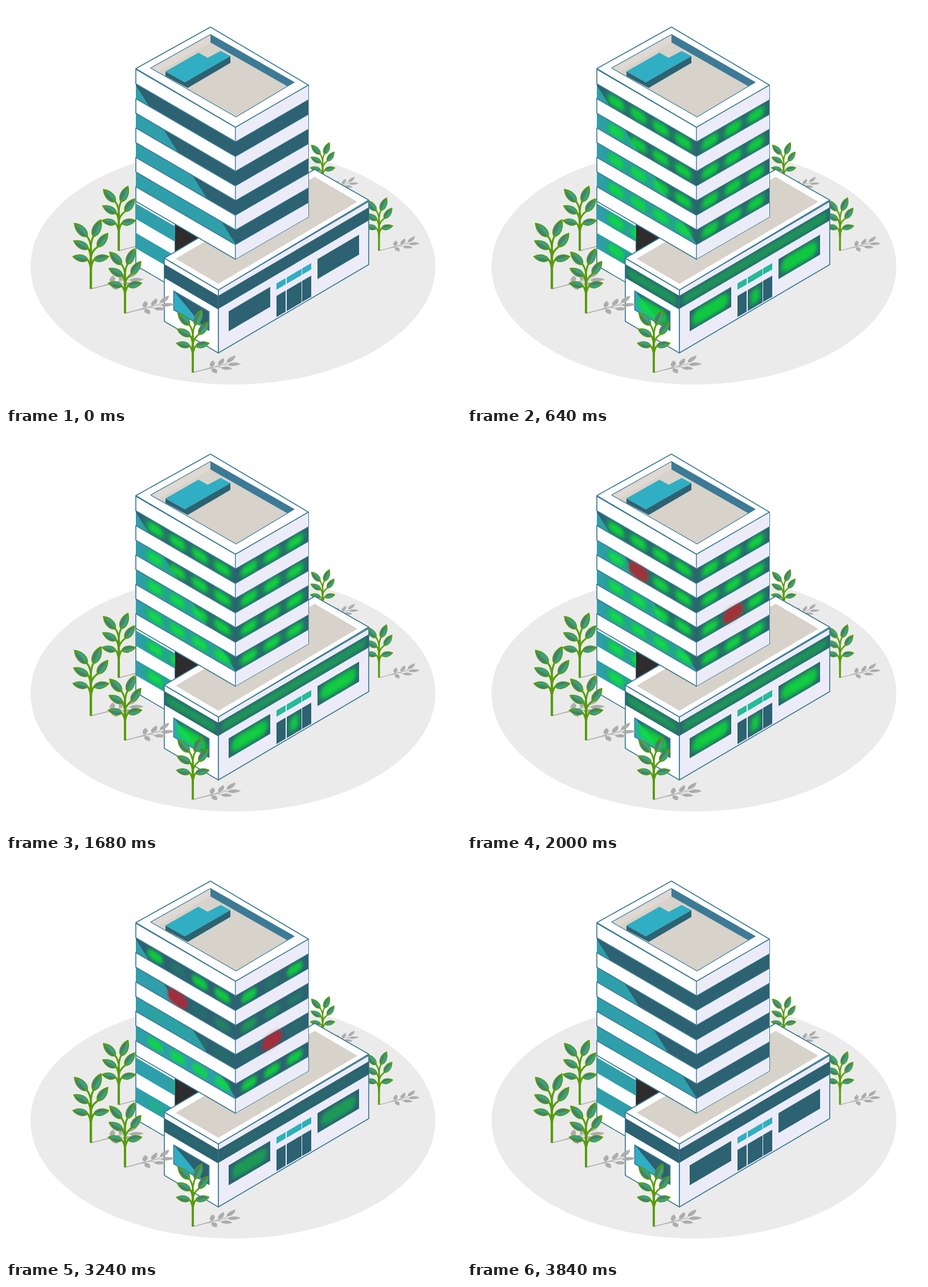
An HTML page for the animation above (4 s loop, 799 by 701 pixels).

```html
<!DOCTYPE html>
<html lang="en">
<head>
<meta charset="utf-8">
<title>Building lights</title>
<style>
html, body { margin: 0; width: 100%; height: 100%; overflow: hidden; background: #fff; }
#stage { display: block; width: 100vw; height: 100vh; }
rect, polygon { vector-effect: non-scaling-stroke; stroke-linejoin: round; }
.light, .red { opacity: 0; }
</style>
</head>
<body>
<svg id="stage" viewBox="0 0 799 701"></svg>
<script>
const LINE = '#3d7a96', DARK = '#2c6272', AQUA = '#30aec4', TEAL = '#2e9fab', PALE = '#ebecf8', BEIGE = '#d7d2ca';
const PITCH = 51.6, BAND = 25.6;

const repeat = (n, make) => Array.from({ length: n }, (_, i) => make(i)).join('');
const poly = (points, fill, stroke = 'none', width = 1.7) =>
  `<polygon points="${points}" fill="${fill}" stroke="${stroke}" stroke-width="${width}"/>`;
const box = (x, y, w, h, fill, stroke = 'none', width = 1.7) =>
  `<rect x="${x}" y="${y}" width="${w}" height="${h}" fill="${fill}" stroke="${stroke}" stroke-width="${width}"/>`;
// A wall in isometric view: its content is laid out flat and skewed.
const wall = (x, y, slope, content) => `<g transform="matrix(1 ${slope} 0 1 ${x} ${y})">${content}</g>`;
// A glass area that clips its content.
const pane = (x, y, w, h, fill, content) =>
  box(x, y, w, h, fill) + `<svg x="${x}" y="${y}" width="${w}" height="${h}">${content}</svg>`;

const glow = (cls, x, y, w, h, blur, fill, opacity = 1) =>
  `<rect class="${cls}" x="${x - w / 2}" y="${y - h / 2}" width="${w}" height="${h}" rx="${Math.min(w, h) * .45}"
    fill="${fill}" opacity="${opacity}" filter="url(#blur${blur})"/>`;

// `level` is the brightness left at 3240 ms; it sets when the light goes out.
const light = (x, y, level, w = 27, h = 17, power = .82) =>
  `<g class="light" data-level="${level}" data-power="${power}">
    ${glow('halo', x, y, w + 11, h + 8, 3, '#10b050', 0)}${glow('core', x, y, w, h, 2, '#0ade36')}
    ${glow('spark', x, y, w * .6, h * .42, 1, '#14e83c', 0)}</g>`;

const red = (x, y) =>
  `<g class="red">${glow('', x, y, 38, 28, 2, '#a82c3a', .3)}${glow('', x, y, 33, 23, 1, '#a82c3a', .93)}</g>`;

// Leaves: [base x, base y, angle from upright]
const leaves = [[4, -86, 24], [11, -69, 37], [-6, -86, -44], [-4, -66, -62], [-5, -48, -78], [5, -48, 78]];

function plant(stem, left, right) {
  return `<g stroke="${stem}" fill="none" stroke-linejoin="round"><path d="M-2 0V-66H2V0Z" fill="${stem}" stroke="none"/>` +
    leaves.map(([x, y, angle]) => `<path d="M0 ${y + 20}Q0 ${y + 8} ${x} ${y}" stroke-width="3"/>
      <g transform="translate(${x} ${y}) rotate(${angle}) scale(${.62 - y / 230})" stroke-width="2">
        <path d="M0 0C-9 -6 -8 -20 0 -30Z" fill="${left}"/><path d="M0 0C9 -6 8 -20 0 -30Z" fill="${right}"/></g>`).join('') + '</g>';
}
const tree = (x, y, size) => `<g transform="translate(${x} ${y}) scale(${size})">
  <g transform="matrix(.12 .38 -.74 .19 0 0)">${plant('url(#shade)', 'url(#shade)', 'url(#shade)')}</g>
  ${plant('#579b08', LINE, '#2fa0b0')}</g>`;

const whiteBands = (w, fill, width) => repeat(5, i => box(0, i * PITCH, w, BAND, fill, LINE, width));
const level = (row, i, from, step) => [i === 1 ? .15 : 1, from + step * i, .1, 1.2][row];
const litRows = (count, w, x, step, from, change) => repeat(4, row =>
  pane(0, BAND + row * PITCH, w, PITCH - BAND, 'none',
    repeat(count, i => light(x + step * i, 13, level(row, i, from, change)))));

function lowerFloors() {
  const floor = i => pane(0, 4 + BAND + (4 + i) * PITCH, 69, 27, TEAL, light(34, 13, i * .3) + light(73, 13, .25));
  return wall(228, 111, .582, box(0, 230, 69, 115, '#fff', LINE) + repeat(2, floor)) +
    poly('297,380 340,406 297,432', '#2e2c2d');
}

function annex() {
  const roof = poly('278,443 542,287 637,341 373,499', '#fff', LINE) +
    poly('298,444 542,300 617,344 373,488', BEIGE);
  const left = box(0, 0, 95, 111, '#fff', LINE) +
    pane(0, 10.5, 95, 24, DARK, light(47, 12, .1, 86, 15, .4)) +
    pane(16, 47.5, 63, 34, DARK, poly('0,0 54,34 0,34', AQUA) + light(32, 17, -.25, 50, 23)) +
    box(16.5, 48, 62, 33, 'none', LINE);
  const windows = [18, 174].map(x => pane(x, 48.5, 73, 35, DARK, light(36.5, 17.5, .55, 61, 24))).join('');
  const entry = [[102, 16], [120, 26], [147, 16]].map(([x, w], i) =>
    pane(x, 49, w, 11, AQUA, light(w / 2, 5, .25, w, 9, .4)) +
    pane(x, 71, w, 37, DARK, i === 1 ? light(w / 2, 18, -.5, 14, 24, .75) : '')).join('');
  const right = box(0, 0, 264, 111, PALE, LINE) +
    pane(0, 10.5, 264, 23, DARK, light(132, 11.5, .1, 252, 15, .4)) + windows + entry;
  return wall(278, 443, .587, left) + wall(373, 498.5, -.588, right) + roof;
}

function tower() {
  const left = box(0, 0, 175, 231, DARK) + poly('0,28 175,205 175,231 0,231', TEAL) +
    litRows(4, 175, 34, 39.2, -.3, .2) + whiteBands(175, '#fff', 1.7) + red(73, 90);
  const right = box(0, 0, 128.5, 231, DARK) +
    litRows(3, 128.5, 24, 40, .5, -.15) + whiteBands(128.5, PALE, 1) + red(64, 141);
  const roof = poly('359,37 531,139 403,213 228,110', '#fff', LINE) +
    poly('254,109 359,50 506,134 404,195', BEIGE) +
    poly('254,109 359,50 359,64 267,116', '#dfd8d3') +
    poly('359,50 506,134 494,141 359,64', LINE) +
    poly('254,109 359,50 506,134 404,195', 'none', LINE, 1.2) +
    poly('280,115 314,134 394,88 394,100 319,144 280,123', DARK) +
    poly('280,115 338,82 354,91 377,79 394,88 314,134', AQUA);
  return wall(228, 111.1, .582, left) + wall(403, 213, -.578, right) + roof;
}

const stage = document.getElementById('stage');
stage.innerHTML = `<defs>
  ${repeat(3, i => `<filter id="blur${i + 1}" x="-60%" y="-100%" width="220%" height="300%"
    color-interpolation-filters="sRGB"><feGaussianBlur stdDeviation="${1.5 * (i + 1)}"/></filter>`)}
  <linearGradient id="shade" gradientUnits="userSpaceOnUse" x1="0" y1="0" x2="0" y2="-113">
    <stop stop-color="#a8a8a8"/><stop offset="1" stop-color="#c8c8c8"/></linearGradient></defs>
  <ellipse cx="398.5" cy="457.5" rx="355.5" ry="207.5" fill="#ebebeb"/>` +
  tree(556, 323, .73) + tree(655, 430, .82) + tree(198, 430, 1) +
  lowerFloors() + annex() + tower() +
  tree(149, 497, 1.07) + tree(209, 540, 1) + tree(328, 644, .97);

const lights = [...stage.querySelectorAll('.light')].map((node, i) => ({
  node,
  power: +node.dataset.power,
  start: i * 7 % 11 * 20,
  end: 3240 - (1 - node.dataset.level) * 320
}));
const halos = stage.querySelectorAll('.halo');
const sparks = stage.querySelectorAll('.spark');
const reds = stage.querySelectorAll('.red');

const ramp = (t, from, to) => Math.min(1, Math.max(0, (t - from) / (to - from)));
const ease = k => k * k * (3 - 2 * k);
const pulse = (t, a, b, c, d) => ease(ramp(t, a, b)) * (1 - ease(ramp(t, c, d)));
const fade = (nodes, value) => nodes.forEach(n => n.style.opacity = value);

function draw(now) {
  const t = Math.floor(now % 4000 / 40) * 40;
  for (const { node, power, start, end } of lights)
    node.style.opacity = power * ramp(t, start, start + 360) * (1 - ramp(t, end, end + 320));
  fade(halos, .5 * pulse(t, 40, 560, 2920, 3240));
  fade(sparks, .6 * pulse(t, 560, 960, 2560, 2920));
  fade(reds, pulse(t, 1640, 2000, 3480, 3840));
  requestAnimationFrame(draw);
}
requestAnimationFrame(draw);
</script>
</body>
</html>
```
